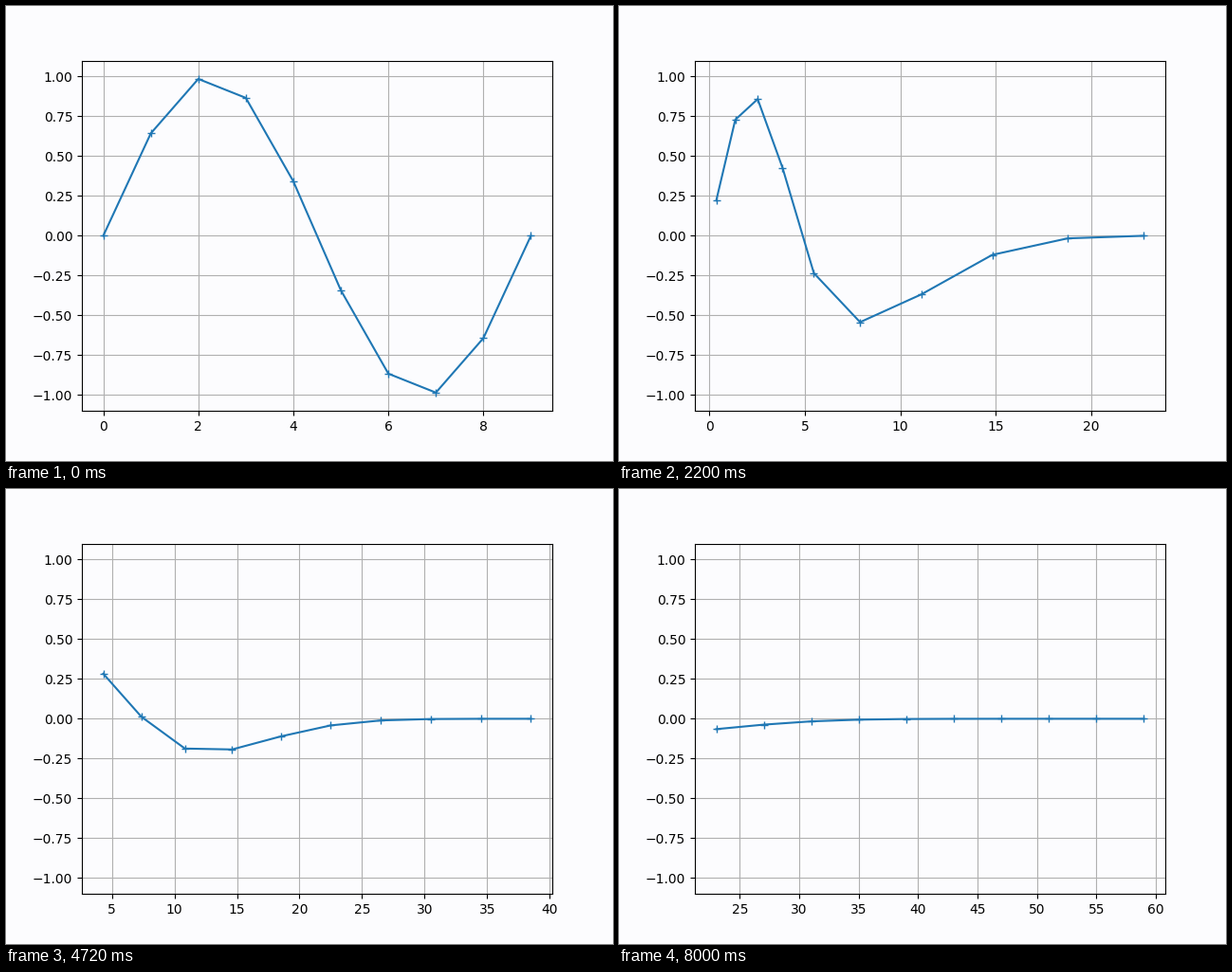
These frames come from a looping animation (640 by 480 pixels, 8.04 s). A matplotlib script:

```python
import numpy as np
import matplotlib.pyplot as plt
from matplotlib.animation import FuncAnimation

N = 10              # beads in the towed chain
FRAMES = 201
INTERVAL = 40
T_END = 50.0
SUBSTEPS = 8

STIFFNESS = 0.5
DAMPING = 1.5
REST = 1.0
TOW_SPEED = 1.0

PAPER = "#fcfcfe"


def slope(state):
    """Each bead is pulled by a spring to the next; the last is towed."""
    pos, vel = state
    gap = pos[1:] - pos[:-1]
    dist = np.hypot(gap[:, 0], gap[:, 1])[:, None]
    acc = np.zeros_like(pos)
    acc[:-1] = STIFFNESS * (dist - REST) * gap / dist - DAMPING * vel[:-1]
    return np.array([vel, acc])


def rk4(state, h):
    a = slope(state)
    b = slope(state + h / 2 * a)
    c = slope(state + h / 2 * b)
    d = slope(state + h * c)
    return state + h / 6 * (a + 2 * b + 2 * c + d)


def simulate():
    x = np.arange(N, dtype=float)
    y = np.sin(2 * np.pi * x / (N - 1))
    state = np.array([np.column_stack([x, y]), np.zeros((N, 2))])
    state[1, -1, 0] = TOW_SPEED
    h = T_END / (FRAMES - 1) / SUBSTEPS
    path = [state[0]]
    for _ in range(FRAMES - 1):
        for _ in range(SUBSTEPS):
            state = rk4(state, h)
        path.append(state[0])
    return path


path = simulate()

fig, ax = plt.subplots(figsize=(6.4, 4.8), dpi=100, facecolor=PAPER)
ax.set_facecolor(PAPER)
ax.set_ylim(-1.1, 1.1)
ax.grid(True)
chain, = ax.plot(*path[0].T, "-+", color="C0")


def draw(i):
    x, y = path[i].T
    chain.set_data(x, y)
    pad = 0.05 * np.ptp(x)
    ax.set_xlim(x.min() - pad, x.max() + pad)
    return chain,


anim = FuncAnimation(fig, draw, frames=FRAMES, interval=INTERVAL,
                     repeat=True, repeat_delay=0, blit=False)
plt.show()
```
